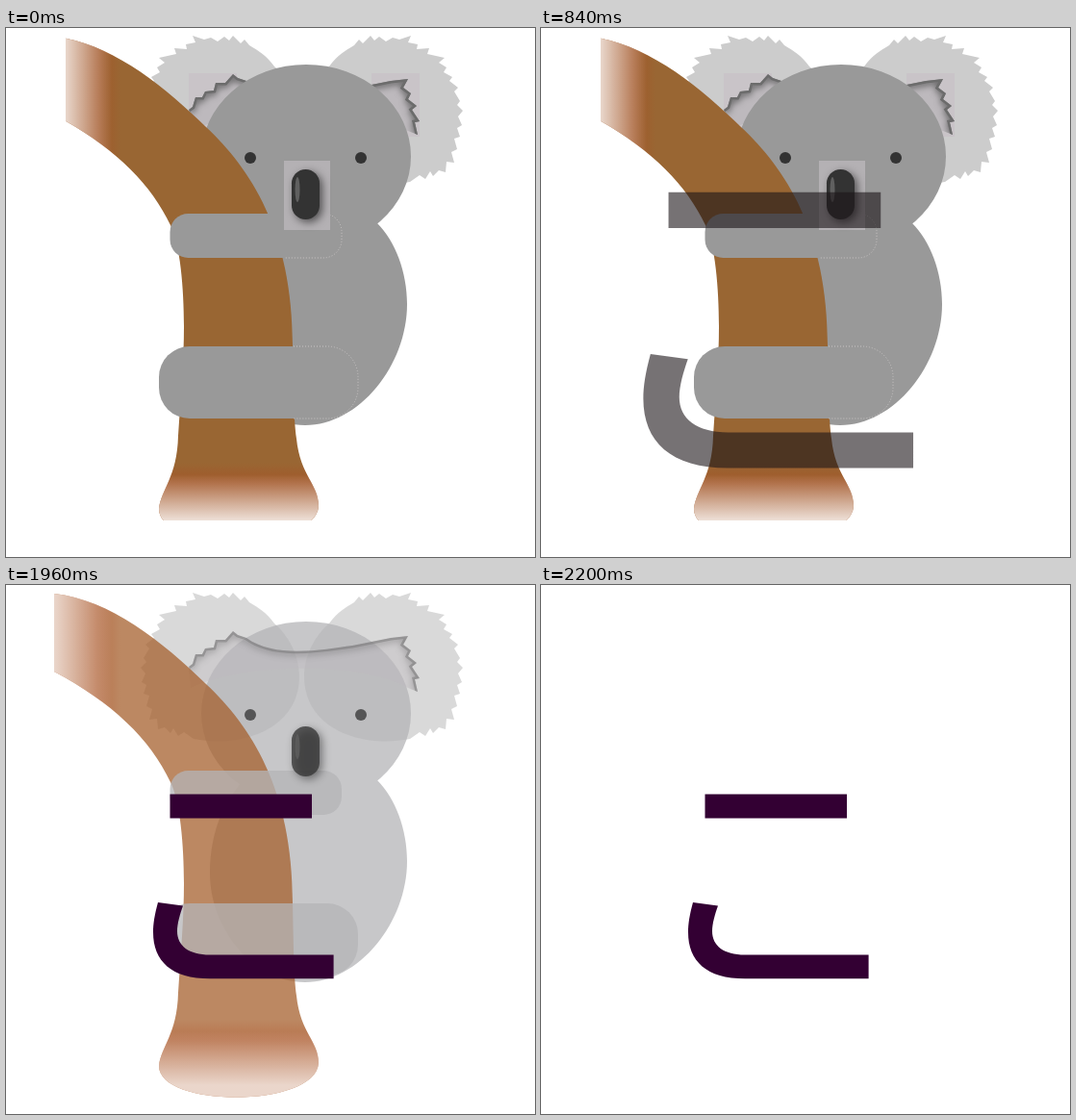
Animation, 550 px wide and 550 px high, one loop 3000 ms. Source, as an HTML page with a canvas:

```html
<!DOCTYPE html>
<html lang="en">
<head>
<meta charset="utf-8">
<title>Koala</title>
<style>
  html, body { margin: 0; width: 100%; height: 100%; overflow: hidden; background: #fff; }
  canvas { display: block; }
</style>
</head>
<body>
<canvas id="stage" width="550" height="550"></canvas>
<script>
const ctx = document.getElementById('stage').getContext('2d');
const LOOP = 3000, STEP = 40;
const POP = { start: 640, steps: 10 };
const FADE = { start: 1920, steps: 8 };
const MIRROR = 615;

const trunk = new Path2D(`M50 9 C108 15 163 59 208 103 C254 146 298 212 298 330
  C299 375 299 405 302 427 C306 466 325 474 325 497 C322 544 159 544 159 500
  C161 480 178 467 179 424 C182 380 185 345 185 310 C185 270 181 225 171 205
  C150 160 110 122 50 90 Z`);
const ear = new Path2D(`M336 40 C345 28 352 24 362 18 L367 12 L371 16 L379 8 L383 13
  L388 9 L395 14 L402 10 L409 12 L421 8 L418 15 L428 17 L427 22 L440 21 L438 27 L456 31
  L450 36 L458 41 L455 46 L464 51 L461 55 L470 62 L466 66 L472 76 L469 80 L475 86 L470 92
  L474 101 L469 104 L472 113 L466 115 L469 126 L463 129 L466 140 L458 139 L457 150
  L450 148 L444 154 L441 149 L436 157 L430 153 L420 160 C370 170 310 150 310 95
  C310 72 322 52 336 40 Z`);
const tuft = new Path2D(`M190 85 L194 82 L197 72 L204 72 L207 66 L216 65 L218 57 L228 57
  L236 48 L241 52 L250 55 C280 77 330 67 360 63 L400 55 L418 53 L413 62 L421 68 L418 74
  L427 81 L422 85 L430 97 L425 98 L428 111`);
const tuftFill = new Path2D(tuft);
tuftFill.lineTo(418, 107);
tuftFill.bezierCurveTo(370, 80, 250, 80, 192, 107);
const torso = new Path2D(`M386 203 C405 222 417 254 417 287 C417 351 367 413 311 413
  C256 413 212 356 212 300 C212 252 230 220 250 200 Z`);
const topBar = new Path2D('M170.5 217.5 H318 V242.5 H170.5 Z');
const hook = new Path2D(`M158 330 C154.5 343 153 352 153 361 C153 391 172 409.3 212 409.3
  H340.6 V384.5 H212 C190 384.5 178 375 178 360 C178 352 181 342 184 333.5 Z`);
const head = oval(312, 133.5, 109, 95.5);
const figure = new Path2D();
figure.addPath(torso);
figure.addPath(head);

function oval(x, y, rx, ry) {
  const path = new Path2D();
  path.ellipse(x, y, rx, ry, 0, 0, Math.PI * 2);
  return path;
}

function pill(x, y, w, h, r) {
  const path = new Path2D();
  path.roundRect(x, y, w, h, r);
  return path;
}

function fill(path, color) {
  ctx.fillStyle = color;
  ctx.fill(path);
}

function ramp(x0, y0, x1, y1, rgb, stops) {
  const gradient = ctx.createLinearGradient(x0, y0, x1, y1);
  for (const [at, alpha] of stops) gradient.addColorStop(at, `rgba(${rgb},${alpha})`);
  return gradient;
}

function drawEars(solid) {
  fill(ear, '#ccc');
  ctx.save();
  ctx.translate(MIRROR, 0);
  ctx.scale(-1, 1);
  fill(ear, '#ccc');
  ctx.restore();
  if (solid) {
    ctx.fillStyle = '#c9c4c8';
    ctx.fillRect(190, 47, 50, 66);
    ctx.fillRect(380, 47, 50, 66);
  }
}

function drawTuft(alpha) {
  ctx.save();
  ctx.globalAlpha = alpha;
  fill(tuftFill, '#bdb9bd');
  ctx.clip(tuftFill);
  ctx.strokeStyle = '#6c6c6c';
  ctx.lineWidth = 5;
  ctx.shadowColor = '#555';
  ctx.shadowBlur = 7;
  ctx.shadowOffsetY = 2;
  ctx.stroke(tuft);
  ctx.restore();
}

function drawNose(solid) {
  if (solid) {
    ctx.fillStyle = '#b4b1b4';
    ctx.fillRect(289, 138, 48, 72);
  }
  ctx.save();
  ctx.shadowColor = 'rgba(0,0,0,.55)';
  ctx.shadowBlur = 8;
  ctx.shadowOffsetX = 3;
  ctx.shadowOffsetY = 3;
  fill(pill(297, 147, 29, 52, 14.5), '#333');
  ctx.restore();
  fill(oval(303, 168, 2.5, 13), '#606060');
}

function drawTrunk(solid) {
  ctx.save();
  if (solid) {
    ctx.beginPath();
    ctx.rect(62, 0, 488, 512);
    ctx.clip();
  }
  ctx.clip(trunk);
  ctx.fillStyle = solid ? '#963' : 'rgb(166,96,46)';
  ctx.fillRect(40, 0, 300, 540);

  // Reddish tint under the white fades at both ends.
  const tint = [[0, 0], [.35, .45], [1, .45]];
  const fade = [[0, 0], [.5, .48], [1, .95]];
  ctx.fillStyle = ramp(119, 0, 50, 0, '175,70,30', tint);
  ctx.fillRect(40, 0, 79, 200);
  ctx.fillStyle = ramp(110, 0, 50, 0, '255,255,255', fade);
  ctx.fillRect(40, 0, 70, 200);
  ctx.fillStyle = ramp(0, 452, 0, 515, '175,70,30', tint);
  ctx.fillRect(150, 452, 185, 88);
  ctx.fillStyle = ramp(0, 464, 0, 520, '255,255,255', fade);
  ctx.fillRect(150, 464, 185, 76);
  ctx.restore();
}

function drawArm(path, color, seamFrom) {
  fill(path, color);
  if (!seamFrom) return;
  ctx.save();
  ctx.beginPath();
  ctx.rect(seamFrom, 0, 550, 550);
  ctx.clip();
  ctx.setLineDash([1, 2]);
  ctx.strokeStyle = '#c8c4c4';
  ctx.stroke(path);
  ctx.restore();
}

function drawKoala(alpha) {
  const solid = alpha === 1;
  const fur = solid ? '#999' : '#b5b5b7';
  ctx.globalAlpha = alpha;
  drawEars(solid);
  if (solid) drawTuft(1);
  fill(figure, fur);
  if (!solid) drawTuft(alpha * .55);
  fill(oval(254, 135, 6, 6), '#333');
  fill(oval(369, 135, 6, 6), '#333');
  drawTrunk(solid);
  drawArm(pill(170.5, 193, 178.5, 46, 19), fur, solid && 289);
  drawArm(pill(159, 331, 207, 75, 32), fur, solid && 299);
  drawNose(solid);
  ctx.globalAlpha = 1;
}

function drawLetter(pop) {
  const scale = 1 + 1.24 * (1 - pop);
  const color = pop < 1 ? 'rgb(28,20,24)' : '#303';
  ctx.save();
  ctx.globalAlpha = pop;
  ctx.translate(247, 312);
  ctx.scale(scale, scale);
  ctx.translate(-247, -312);
  fill(topBar, color);
  fill(hook, color);
  ctx.restore();
}

// Stepped progress: 0 before the start, 1 on the last step.
function progress(time, { start, steps }) {
  const step = Math.floor((time - start) / STEP) + 1;
  return Math.min(Math.max(step, 0), steps) / steps;
}

function draw() {
  const time = performance.now() % LOOP;
  const pop = progress(time, POP);
  const alpha = 1 - progress(time, FADE);
  ctx.fillStyle = '#fff';
  ctx.fillRect(0, 0, 550, 550);
  if (alpha > 0) drawKoala(alpha);
  if (pop > 0) drawLetter(pop);
  requestAnimationFrame(draw);
}
draw();
</script>
</body>
</html>
```
